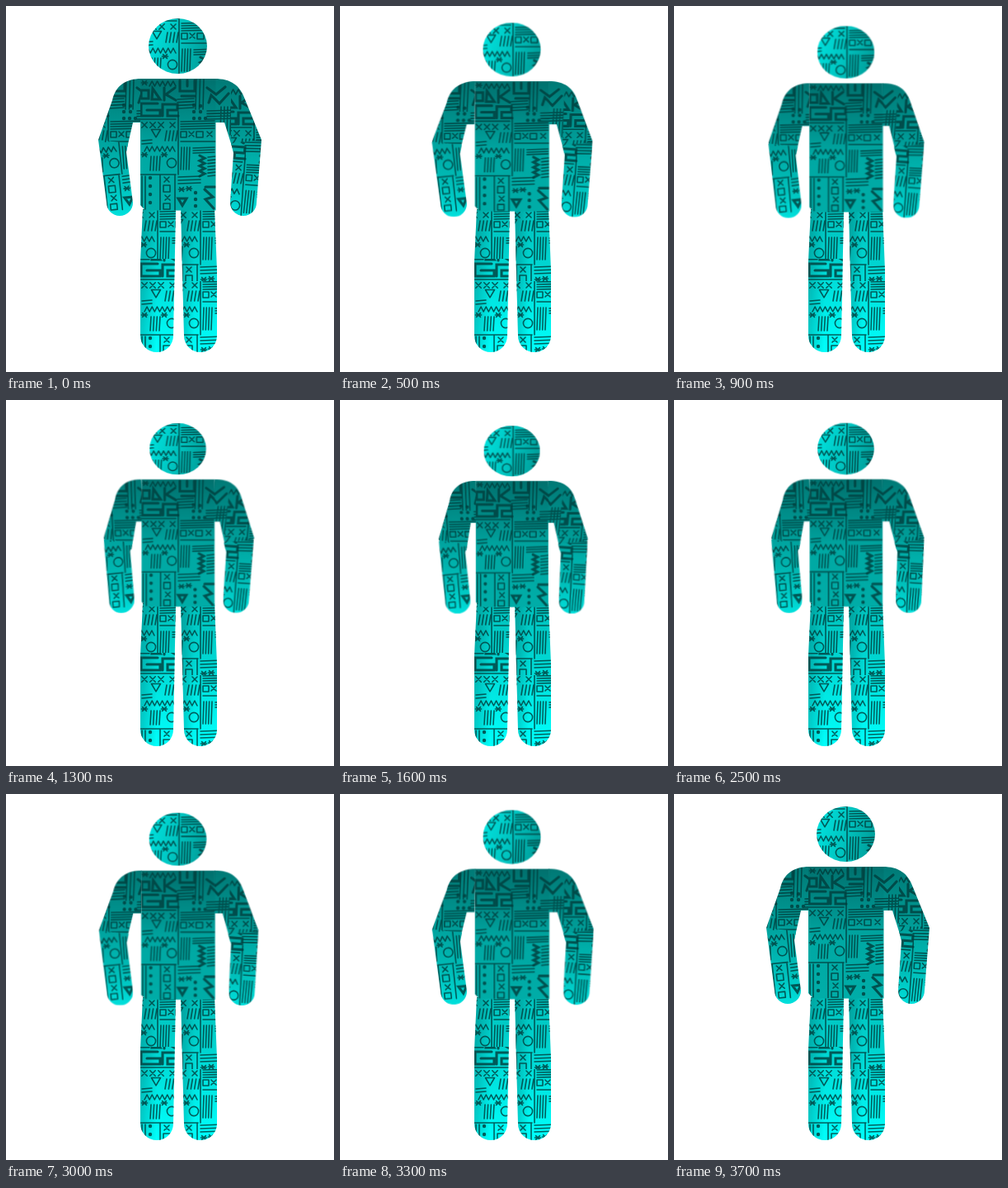
An HTML page that plays this animation: 398 px wide and 443 px high, repeating every 3.8 s.

```html
<!DOCTYPE html>
<html lang="en">
<head>
<meta charset="utf-8">
<title>Patterned figure breathing</title>
<style>
html, body { margin: 0; width: 100%; height: 100%; overflow: hidden; background: #fff; }
svg.stage { display: block; width: 100vw; height: 100vh; }
.move { animation: 3800ms infinite; }
#thin, #bold, #dots { fill: none; stroke: #003f3e; stroke-opacity: .82; stroke-linecap: round; stroke-linejoin: round; }
#thin { stroke-width: 1.6; }
#bold { stroke-width: 3.1; stroke-linejoin: miter; }
#dots { stroke-width: 4.4; }

.head { transform-origin: 208.5px 15px; animation-name: head; }
.body { transform-origin: 208.5px 88px; animation-name: body; }
.arm-l { transform-origin: 163px 100px; animation-name: arm-l; }
.arm-r { transform-origin: 254px 100px; animation-name: arm-r; }
.hand-l { transform-origin: 122px 254px; animation-name: hand-l; }
.hand-r { transform-origin: 304px 254px; animation-name: hand-r; }

@keyframes head {
  0% { transform: translateY(0) scale(1, 1); animation-timing-function: steps(19); }
  50% { transform: translateY(19px) scale(.956, .903); animation-timing-function: steps(18); }
  97.368%, 100% { transform: translateY(0) scale(1, 1); }
}
@keyframes body {
  0% { transform: translateY(0) scale(1, 1); animation-timing-function: steps(19); }
  50% { transform: translateY(11.5px) scale(.956, .953); animation-timing-function: steps(18); }
  97.368%, 100% { transform: translateY(0) scale(1, 1); }
}
@keyframes arm-l {
  0% { transform: skewX(0deg); animation-timing-function: steps(6); }
  15.789% { transform: skewX(-1.6deg); animation-timing-function: steps(7); }
  34.211% { transform: skewX(3.3deg); animation-timing-function: steps(6); }
  50% { transform: skewX(4.4deg); animation-timing-function: steps(6); }
  65.789% { transform: skewX(3deg); animation-timing-function: steps(6); }
  81.579% { transform: skewX(-1.6deg); animation-timing-function: steps(6); }
  97.368%, 100% { transform: skewX(0deg); }
}
@keyframes arm-r {
  0% { transform: skewX(0deg); animation-timing-function: steps(13); }
  34.211% { transform: skewX(-5.4deg); animation-timing-function: steps(6); }
  50% { transform: skewX(-4.6deg); animation-timing-function: steps(18); }
  97.368%, 100% { transform: skewX(0deg); }
}
@keyframes hand-l {
  0% { transform: translate(0, 0) skewX(0deg) scale(1, 1); animation-timing-function: steps(6); }
  15.789% { transform: translate(0, 1.5px) skewX(.4deg) scale(1, .988); animation-timing-function: steps(7); }
  34.211% { transform: translate(2.5px, 3.7px) skewX(-2.4deg) scale(.96, .967); animation-timing-function: steps(6); }
  50% { transform: translate(8px, 5.3px) skewX(-.4deg) scale(.956, .951); animation-timing-function: steps(6); }
  65.789% { transform: translate(2px, 3.7px) skewX(-2.4deg) scale(.97, .967); animation-timing-function: steps(6); }
  81.579% { transform: translate(0, 1.5px) skewX(.2deg) scale(1, .988); animation-timing-function: steps(6); }
  97.368%, 100% { transform: translate(0, 0) skewX(0deg) scale(1, 1); }
}
@keyframes hand-r {
  0% { transform: translate(0, 0) skewX(0deg) scale(1, 1); animation-timing-function: steps(13); }
  34.211% { transform: translate(-9.3px, 3.7px) skewX(0deg) scale(.98, .967); animation-timing-function: steps(6); }
  50% { transform: translate(-5px, 5.3px) skewX(2.8deg) scale(.956, .951); animation-timing-function: steps(18); }
  97.368%, 100% { transform: translate(0, 0) skewX(0deg) scale(1, 1); }
}
</style>
</head>
<body>
<svg class="stage" viewBox="0 0 398 443" preserveAspectRatio="none">
  <defs>
    <g id="sheet"><path id="thin"/><path id="bold"/><path id="dots"/></g>

    <linearGradient id="headFill" gradientUnits="userSpaceOnUse" x1="176" y1="30" x2="244" y2="46">
      <stop offset="0" stop-color="#00e0dc"/><stop offset=".5" stop-color="#00c4c0"/><stop offset="1" stop-color="#00a09c"/>
    </linearGradient>
    <linearGradient id="bodyFill" gradientUnits="userSpaceOnUse" x1="0" y1="88" x2="0" y2="247">
      <stop offset="0" stop-color="#00716e"/><stop offset=".3" stop-color="#008d89"/>
      <stop offset=".55" stop-color="#00a8a3"/><stop offset="1" stop-color="#00ada8"/>
    </linearGradient>
    <linearGradient id="armFill" gradientUnits="userSpaceOnUse" x1="0" y1="88" x2="0" y2="172">
      <stop offset="0" stop-color="#007975"/><stop offset="1" stop-color="#00a39e"/>
    </linearGradient>
    <linearGradient id="handFill" gradientUnits="userSpaceOnUse" x1="0" y1="162" x2="0" y2="254">
      <stop offset="0" stop-color="#00a39e"/><stop offset=".6" stop-color="#00c0bb"/><stop offset="1" stop-color="#00e0dc"/>
    </linearGradient>
    <linearGradient id="legFill" gradientUnits="userSpaceOnUse" x1="0" y1="247" x2="0" y2="415">
      <stop offset="0" stop-color="#00c0bb"/><stop offset=".4" stop-color="#00d6d2"/><stop offset="1" stop-color="#00fffb"/>
    </linearGradient>
    <linearGradient id="shade">
      <stop offset="0" stop-color="#033" stop-opacity=".24"/><stop offset="1" stop-color="#033" stop-opacity="0"/>
    </linearGradient>

    <clipPath id="headClip"><ellipse cx="208.5" cy="48.5" rx="35.5" ry="33.5"/></clipPath>
    <clipPath id="torsoClip"><path d="M163 88H254.500V247.500H169L163 241Z"/></clipPath>
    <clipPath id="armLClip"><path d="M164 88C146 88 133 96 129 114L112 162L120 176H146L154 141H164Z"/></clipPath>
    <clipPath id="armRClip"><path d="M253 88C273 88 284 96 290 113L310 162L300 176H276L265 141H253Z"/></clipPath>
    <clipPath id="handLClip"><path d="M112 162L122 238A16 16 0 0 0 154 238L146 177L148 166Z"/></clipPath>
    <clipPath id="handRClip"><path d="M310 162L304 238A16 16 0 0 1 272 238L276 178L273 166Z"/></clipPath>
    <clipPath id="legLClip"><path d="M166 246H206L203 399A20 20 0 0 1 163 399V310Z"/></clipPath>
    <clipPath id="legRClip"><path d="M212 246H253L256 320V399A20 20 0 0 1 216 399Z"/></clipPath>
  </defs>

  <g clip-path="url(#legLClip)">
    <rect x="160" y="245" width="50" height="176" fill="url(#legFill)"/>
    <rect x="163" y="245" width="20" height="176" fill="url(#shade)"/>
    <svg x="163" y="246" width="44" height="60" viewBox="188 137 44 60"><use href="#sheet"/></svg>
    <svg x="163" y="306" width="44" height="114" viewBox="188 112 44 114"><use href="#sheet" x="25"/></svg>
    <svg x="163" y="334" width="44" height="86" viewBox="188 140 44 86"><rect x="188" y="140" width="44" height="86" fill="none"/></svg>
  </g>
  <g clip-path="url(#legRClip)">
    <rect x="210" y="245" width="50" height="176" fill="url(#legFill)"/>
    <rect x="213" y="245" width="16" height="176" fill="url(#shade)"/>
    <svg x="212" y="246" width="46" height="87" viewBox="185 137 46 87"><use href="#sheet"/></svg>
    <svg x="212" y="333" width="46" height="87" viewBox="185 139 46 87"><use href="#sheet"/></svg>
  </g>

  <g class="move body">
    <g class="move arm-l"><g clip-path="url(#armLClip)">
      <rect x="110" y="88" width="54" height="90" fill="url(#armFill)"/>
      <svg x="110" y="88" width="54" height="90" viewBox="195 88 54 90"><use href="#sheet"/></svg>
    </g></g>
    <g class="move arm-r"><g clip-path="url(#armRClip)">
      <rect x="253" y="88" width="58" height="90" fill="url(#armFill)"/>
      <svg x="253" y="88" width="20" height="90" viewBox="253 88 20 90"><use href="#sheet"/></svg>
      <svg x="273" y="88" width="38" height="90" viewBox="181 78 38 90"><use href="#sheet"/></svg>
    </g></g>
    <g clip-path="url(#torsoClip)">
      <rect x="162" y="88" width="94" height="160" fill="url(#bodyFill)"/>
      <use href="#sheet"/>
    </g>
  </g>

  <g class="move hand-l"><g clip-path="url(#handLClip)">
    <rect x="110" y="160" width="48" height="96" fill="url(#handFill)"/>
    <svg x="110" y="160" width="48" height="96" viewBox="178 160 48 96"><use href="#sheet" transform="rotate(-6 202 205)"/></svg>
  </g></g>
  <g class="move hand-r"><g clip-path="url(#handRClip)">
    <rect x="268" y="160" width="44" height="96" fill="url(#handFill)"/>
    <svg x="268" y="160" width="44" height="96" viewBox="191 108 44 96"><use href="#sheet" transform="rotate(4 210 190)"/></svg>
  </g></g>

  <g class="move head"><g clip-path="url(#headClip)">
    <rect x="172" y="14" width="74" height="70" fill="url(#headFill)"/>
    <use href="#sheet" x="1" y="-119"/>
  </g></g>
</svg>
<script>
const times = (n, f) => Array.from({ length: n }, (_, i) => f(i)).join('');
const bars = (x, y, w, h, n, lean = 1) => times(n, i => `M${x + w * i / (n - 1)} ${y}l${-lean} ${h}`);
const rows = (x, y, w, h, n) => times(n, i => `M${x} ${y + h * i / (n - 1)}l${w} -1`);
const zig = (x, y, w, h, n) => `M${x} ${y + h}` + times(n, () => `l${w / n / 2} ${-h}l${w / n / 2} ${h}`);
const zag = (x, y, w, h, n) => `M${x} ${y}` + times(n, () => `l${w} ${h / n / 2}l${-w} ${h / n / 2}`);
const cross = (x, y, r = 3) => `M${x - r} ${y - r}l${2 * r} ${2 * r}M${x + r} ${y - r}l${-2 * r} ${2 * r}`;
const star = (x, y) => cross(x, y, 2.4) + `M${x - 3.6} ${y}h7.2`;
const box = (x, y, w, h) => `M${x} ${y}h${w}v${h}h${-w}z`;
const tri = (x, y, r) => `M${x - r} ${y - r}h${2 * r}l${-r} ${1.7 * r}z`;
const ring = (x, y, r) => `M${x - r} ${y}a${r} ${r} 0 1 0 ${2 * r} 0a${r} ${r} 0 1 0 ${-2 * r} 0z`;
const dot = (x, y) => `M${x} ${y}h.01`;
const draw = (id, ...parts) => document.getElementById(id).setAttribute('d', parts.join(''));

draw('thin',
  // top band
  star(168, 93), zig(174, 91, 32, 6, 5), rows(208, 113, 20, 11, 4),
  bars(231, 89, 9, 36, 3), rows(244, 127, 40, 10, 4), bars(261, 122, 12, 34, 4),
  // crosses, bars and squares
  'M163 137H206M209 128V168',
  times(3, i => cross(168 + i * 10, 144, 3.2)), cross(202, 144),
  bars(195, 151, 13, 12, 4, 2), rows(212, 140, 41, 9, 4),
  box(212, 152, 7, 7), cross(225, 155), box(231, 152, 8, 7), cross(247, 155),
  'M212 164H254', rows(165, 163, 12, 4, 2), tri(182, 155, 5.5),
  // ring band
  'M209 168V204M163 204H206', zig(168, 170, 37, 6, 6), star(168, 180), star(192, 180),
  bars(176, 182, 11, 17, 4), ring(201, 190, 5.6),
  bars(213, 171, 10, 27, 4), rows(227, 172, 26, 6, 3), rows(245, 183, 9, 23, 7),
  // lower band
  bars(165, 206, 4, 40, 2, 0), 'M187 204V247M205 204V247',
  cross(195, 210), box(191, 217, 8, 8), cross(196, 232), box(191, 239, 8, 7),
  rows(209, 207, 27, 8, 3), star(213, 222), star(222, 221)
);
draw('bold',
  'M211 90V103H229V90M220 90V97M213 109H229',
  box(164, 102, 9, 10), 'M178 100L187 113H177ZM192 99V114M205 99L194 107L206 114',
  'M184 118H164V133H187V126H171M190 133V119H208V126H196V133H209',
  'M244 99L255 107L266 98M246 117L249 108L259 118L270 106',
  tri(214, 238, 5), 'M241 222L251 231L242 234L252 245M242 219H254',
  zag(235, 181, 6, 25, 4)
);
draw('dots',
  times(4, i => dot(175, 208 + i * 10)), times(3, i => dot(230, 226 + i * 8)),
  times(3, i => dot(228 + i * 7, 136)), times(2, i => dot(228, 120 + i * 8)),
  times(2, i => dot(236, 121 + i * 7))
);
</script>
</body>
</html>
```
